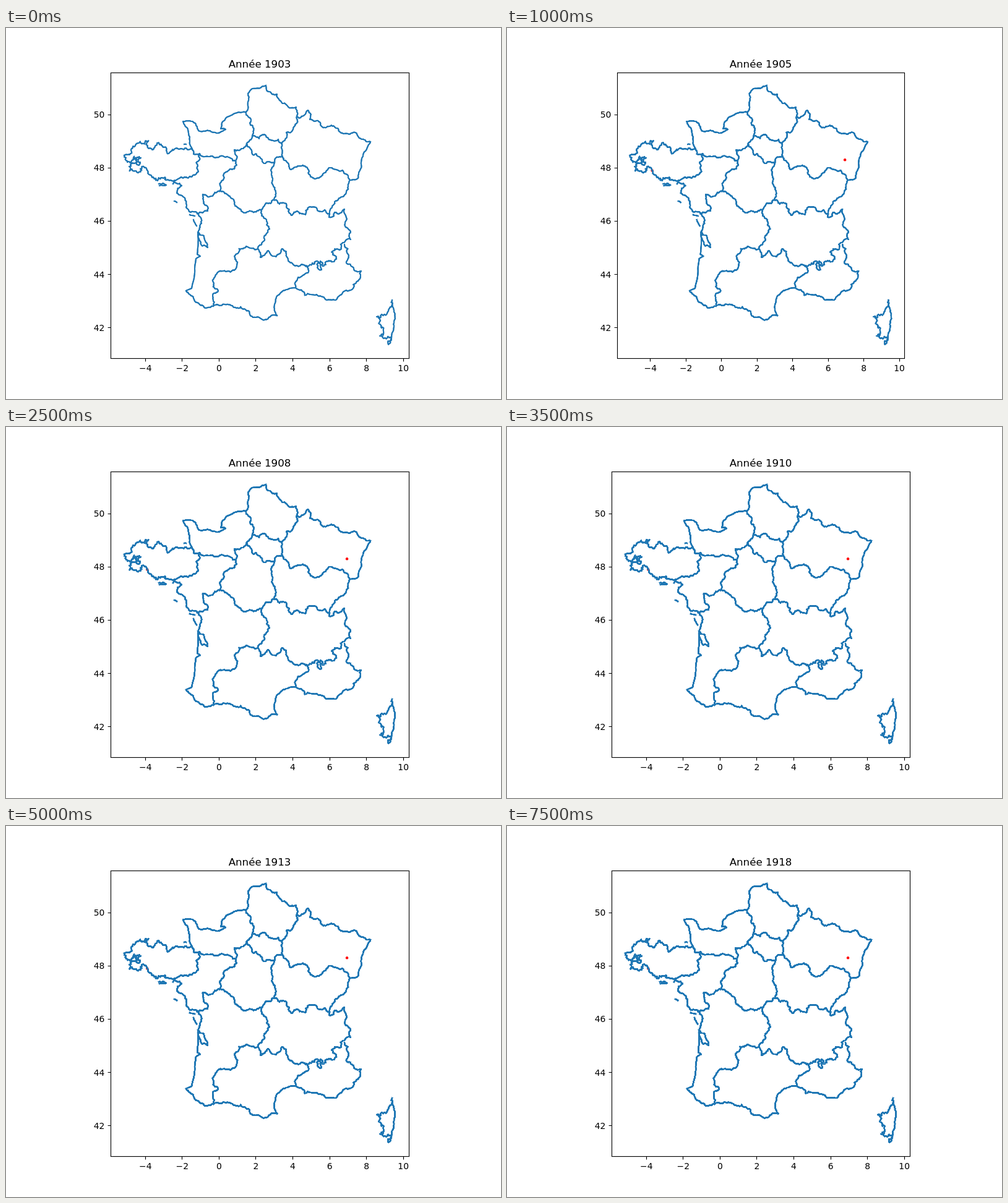
An HTML page with a canvas that plays this animation: 800x600 px, repeating every 8 s.

```html
<!DOCTYPE html>
<html lang="fr">
<head>
<meta charset="utf-8">
<title>Carte par année</title>
<style>
html, body { margin: 0; width: 100%; height: 100%; overflow: hidden; background: #fff; }
canvas { display: block; width: 800px; height: 600px; }
</style>
</head>
<body>
<canvas id="stage" width="800" height="600"></canvas>
<script>
const ctx = document.getElementById('stage').getContext('2d');
const STEP = 500, COUNT = 16, FIRST_YEAR = 1903;
const TOP = 72, BOTTOM = 534;
const lines = [];

let seed = 11;
function random() {
  seed = (seed * 16807) % 2147483647;
  return seed / 2147483647;
}

// Midpoint displacement: turns a straight leg into a crooked one.
function wander(out, x0, y0, x1, y1, rough) {
  const dx = x1 - x0, dy = y1 - y0;
  if (Math.hypot(dx, dy) < 3) {
    out.push([x1, y1]);
    return;
  }
  const bend = (random() - .5) * rough;
  const mx = (x0 + x1) / 2 - dy * bend, my = (y0 + y1) / 2 + dx * bend;
  wander(out, x0, y0, mx, my, rough);
  wander(out, mx, my, x1, y1, rough);
}

function curve(rough, ...xy) {
  const out = [[xy[0], xy[1]]];
  for (let i = 2; i < xy.length; i += 2) {
    wander(out, xy[i - 2], xy[i - 1], xy[i], xy[i + 1], rough);
  }
  lines.push(out);
}

const SMOOTH = .06, SOFT = .25, ROUGH = .5, JAGGED = .9;

function traceCoast() {
  curve(SOFT, 303,199, 297,176, 286,151, 306,154, 311,166, 340,170, 355,164, 347,163, 349,153, 387,136);
  curve(SOFT, 387,136, 391,131, 391,106, 398,98, 420,93);
  curve(ROUGH, 569,409, 540,432, 533,440, 502,431, 468,420);
  curve(SOFT, 468,420, 440,432, 434,447, 438,465);
  curve(SMOOTH, 291,425, 300,421, 307,373, 314,369, 309,366, 310,330);
  curve(ROUGH, 310,330, 320,338, 326,355, 311,328, 316,316, 309,300);
  curve(ROUGH, 309,299, 291,290, 276,267, 284,255, 268,247);
  curve(JAGGED, 268,247, 252,242, 229,231, 217,228, 199,224, 217,217, 207,212, 218,210, 191,206);
  curve(JAGGED, 191,206, 203,200, 235,195, 244,189, 263,203, 272,196, 303,199);
}

function traceIslands() {
  curve(ROUGH, 247,252, 259,254, 248,255);
  curve(SOFT, 272,280, 276,282);
  curve(SOFT, 288,188, 291,188);
  curve(SOFT, 297,302, 305,304);
  curve(SOFT, 303,310, 308,320);
  curve(SOFT, 624,440, 629,470, 621,507);
  curve(JAGGED, 621,507, 618,512, 604,498, 599,467, 620,453, 624,440);
}

function traceFrontier() {
  curve(ROUGH, 420,93, 424,103, 438,107, 442,117, 453,124, 469,128, 470,143, 482,141, 488,133,
    491,148, 510,159, 535,162, 545,171, 575,180, 589,184);
  curve(SOFT, 589,184, 575,211, 569,243, 556,246);
  curve(ROUGH, 556,246, 553,256, 531,281, 523,300);
  curve(ROUGH, 523,300, 522,306, 530,304, 531,298, 547,293, 548,314, 557,342, 541,350);
  curve(ROUGH, 547,350, 553,366, 550,380, 574,393, 569,409);
  curve(ROUGH, 438,465, 404,468, 391,457, 366,449, 335,450, 303,437, 291,425);
}

function traceNorth() {
  curve(ROUGH, 387,136, 396,150, 398,175);
  curve(ROUGH, 398,175, 389,187, 369,197, 371,215);
  curve(ROUGH, 303,199, 303,204, 341,209, 355,209, 371,215);
  curve(ROUGH, 389,187, 398,204, 417,219, 434,218, 435,211, 447,208, 446,188);
  curve(ROUGH, 398,175, 440,180, 446,188);
  curve(ROUGH, 446,188, 453,169, 464,164, 470,143);
  curve(ROUGH, 447,208, 461,229, 486,225, 502,243, 524,226, 544,230, 556,246);
}

function traceMiddle() {
  curve(ROUGH, 434,218, 431,245, 436,266, 433,278);
  curve(ROUGH, 433,278, 453,284, 461,303, 484,302, 489,290, 523,300);
  curve(ROUGH, 433,278, 412,294);
  curve(ROUGH, 412,294, 380,296, 366,276, 345,264);
  curve(ROUGH, 345,264, 351,246, 369,228, 371,215);
  curve(ROUGH, 345,264, 318,269, 326,296, 309,300);
  curve(ROUGH, 313,204, 311,232, 288,241, 270,252);
}

function traceSouth() {
  curve(ROUGH, 412,294, 421,310, 417,338, 407,357);
  curve(ROUGH, 407,357, 411,371, 424,360, 431,369, 446,357, 463,381, 483,384);
  curve(ROUGH, 407,357, 388,353, 371,390, 338,402, 343,425, 335,450);
  curve(ROUGH, 483,384, 488,396, 468,420);
  curve(JAGGED, 483,384, 495,380, 510,391, 508,377, 530,360, 541,350);
}

traceCoast();
traceIslands();
traceFrontier();
traceNorth();
traceMiddle();
traceSouth();

const wide = { left: 169, right: 651, zero: 344.4, unit: 29.78 };
const narrow = { left: 178, right: 642, zero: 346.7, unit: 28.74 };
const latY = lat => 140 + (50 - lat) * 43.1;

function label(text, x, y, size, align) {
  ctx.font = size + 'px "DejaVu Sans", sans-serif';
  ctx.textAlign = align;
  ctx.fillText(text, x, y);
}

function drawDot(view, lon, lat) {
  ctx.fillStyle = '#f00';
  ctx.beginPath();
  ctx.arc(view.zero + lon * view.unit, latY(lat), 2.2, 0, Math.PI * 2);
  ctx.fill();
}

function drawMap(view, passes) {
  const k = view.unit / wide.unit;
  ctx.strokeStyle = '#1f77b4';
  ctx.lineWidth = 2.08;
  ctx.lineJoin = 'round';
  ctx.lineCap = 'square';
  ctx.beginPath();
  for (const line of lines) {
    line.forEach(([x, y], i) => {
      const px = view.zero + (x - wide.zero) * k;
      if (i) ctx.lineTo(px, y); else ctx.moveTo(px, y);
    });
  }
  // Overlaid passes firm up the soft edges year after year.
  for (let i = 0; i < passes; i++) ctx.stroke();
}

function drawAxes(view, year) {
  ctx.strokeStyle = ctx.fillStyle = '#000';
  ctx.lineWidth = 1.11;
  ctx.lineCap = 'butt';
  ctx.lineJoin = 'miter';
  ctx.strokeRect(view.left + .5, TOP + .5, view.right - view.left, BOTTOM - TOP);
  ctx.beginPath();
  for (let lon = -4; lon <= 10; lon += 2) {
    const x = view.zero + lon * view.unit;
    const tick = Math.floor(x) + .5;
    ctx.moveTo(tick, BOTTOM + .5);
    ctx.lineTo(tick, BOTTOM + 5.4);
    label(String(lon).replace('-', '\u2212'), x, 555, 13.89, 'center');
  }
  for (let lat = 42; lat <= 50; lat += 2) {
    const y = latY(lat);
    const tick = Math.floor(y) + .5;
    ctx.moveTo(view.left + .5, tick);
    ctx.lineTo(view.left - 4.4, tick);
    label(lat, view.left - 9.7, Math.round(y) + 5, 13.89, 'right');
  }
  ctx.stroke();
  label('Année ' + year, 410, 64, 16.67, 'center');
}

function draw(index) {
  const year = FIRST_YEAR + index;
  const view = year === 1905 ? narrow : wide;
  ctx.fillStyle = '#fff';
  ctx.fillRect(0, 0, 800, 600);
  if (year >= 1905) {
    drawDot(view, -3.9, 47.9);
    drawDot(view, 6.94, 48.3);
  }
  drawMap(view, index + 2);
  drawAxes(view, year);
}

const start = performance.now();
let shown = -1;
function tick() {
  const index = Math.floor((performance.now() - start) / STEP) % COUNT;
  if (index !== shown) draw(shown = index);
  requestAnimationFrame(tick);
}
tick();
</script>
</body>
</html>
```
